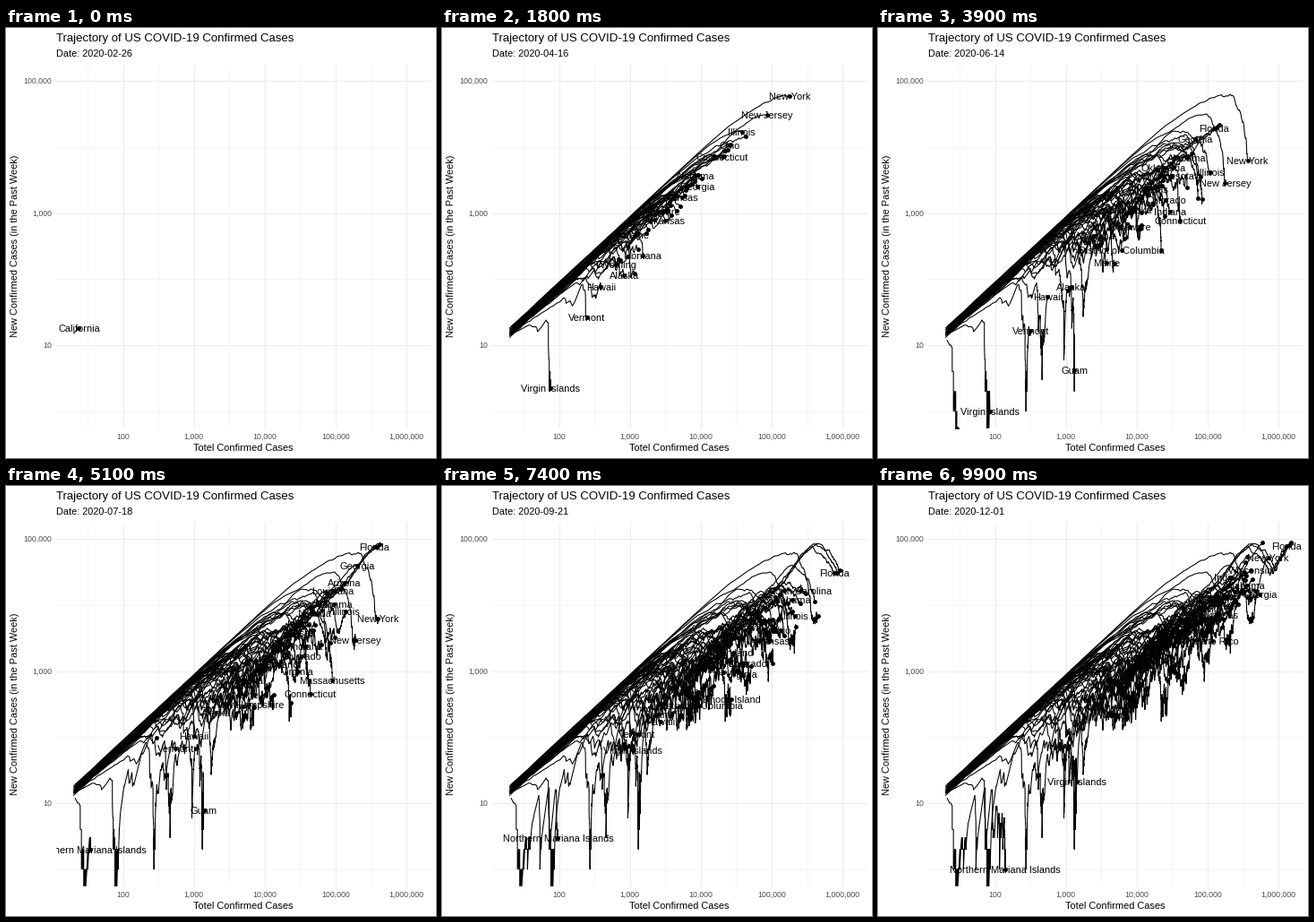
A matplotlib script that plays this animation: 480 by 480 pixels, repeating every 10 s.

```python
import numpy as np
import matplotlib.pyplot as plt
from matplotlib.animation import FuncAnimation
from matplotlib.collections import LineCollection

SIZE, DPI, FRAMES, LAST_DAY = 480, 96, 100, 279
PX = 72 / DPI                       # one pixel in points
LEFT, RIGHT, TOP, BOTTOM = 56, 474.5, 40.5, 446.5
DEC_X, DEC_Y = 79.15, 73.75         # pixels per decade
START = np.datetime64("2020-02-26")
PAD = 30                            # days simulated before the first date

X_LO, X_HI = (2 + (x - 130.5) / DEC_X for x in (LEFT, RIGHT))
Y_LO, Y_HI = (1 - (y - 354) / DEC_Y for y in (BOTTOM, TOP))

plt.rcParams["font.family"] = "Liberation Sans"
rng = np.random.default_rng(19)

# Each group shares one epidemic curve: log10 of weekly cases on these days.
# Scale and first day run evenly from its first member to its last.
KNOTS = [30, 50, 80, 109, 143, 208, 279]
GROUPS = [  # curve, scale range, first-day range, members
    ([-.4, 0, -.55, -1.05, -1.1, -1, -.1], (4.85, 3.6), (6, 13),
     "New York,New Jersey,Massachusetts,Connecticut,Rhode Island"),
    ([-1.4, -1, -.85, -.65, 0, -.42, 0], (4.95, 4.88), (1, 11),
     "California,Texas,Florida"),
    ([-1.2, -.63, -.85, -1.15, -1, -.85, 0], (4.8, 3.3), (8, 14),
     "Illinois,Ohio,Pennsylvania,Michigan,Indiana,Colorado,Virginia,"
     "Maryland,Washington,Delaware,New Hampshire,District of Columbia,Maine"),
    ([-1.25, -.8, -.75, -.42, 0, -.22, 0], (4.42, 3.75), (8, 15),
     "Georgia,Arizona,Tennessee,North Carolina,Alabama,Louisiana,"
     "South Carolina,Oklahoma,Nevada,Mississippi,Arkansas,Idaho,Puerto Rico"),
    ([-1.5, -1.2, -1, -1.1, -.72, -.3, 0], (4.55, 3.5), (8, 16),
     "Wisconsin,Minnesota,Missouri,Utah,Kansas,Kentucky,Iowa,Nebraska,"
     "New Mexico,Oregon,South Dakota,North Dakota,West Virginia,Wyoming"),
    ([-1.1, -1.3, -2.4, -1.5, -1, -.7, 0], (3.8, 2.8), (12, 15),
     "Montana,Alaska,Hawaii,Vermont"),
    ([.3, -.3, -1.4, -1.6, -1.5, .1, 0], (2.4, 2.4), (15, 15), "Guam"),
    ([-.2, -1.2, -1.4, -1.3, .5, .2, 0], (1.5, 1.5), (20, 20),
     "Virgin Islands"),
    ([0, -1, .2, .4, 0], (.4, .4), (70, 70), "Northern Mariana Islands"),
]


def trajectory(first, levels):
    """Daily log10 totals and weekly new cases, plus the first index shown."""
    days = np.arange(-PAD, LAST_DAY + 1)
    knots = KNOTS[-len(levels):]
    slope = max((levels[0] - 1.3) / (knots[0] - first), .07)
    xs = [first - 60, first, *knots]
    ys = [1.3 - 60 * slope, 1.3, *levels]
    level = np.mean([np.interp(days + 3 + k, xs, ys)
                     for k in (-4, -2, 0, 2, 4)], axis=0)
    sigma = np.clip(1.3 - .27 * level, .12, 1.2)
    sigma[days < max(30, first + 5)] = .08
    noise = np.exp(sigma * rng.normal(size=len(days)) - sigma ** 2 / 2)
    total = np.floor(np.cumsum(10 ** level / 7 * noise))
    new = total - np.concatenate([np.zeros(7), total[:-7]])
    lx = np.log10(np.maximum(total, 1))
    ly = np.where(new > 0, np.log10(np.maximum(new, 1)), Y_LO)
    return np.column_stack([lx, ly]), int(np.argmax(total >= 20))


tracks = {}
for curve, scales, firsts, members in GROUPS:
    members = members.split(",")
    count = len(members)
    spread = .1 if count > 5 else 0
    for name, scale, first in zip(members, np.linspace(*scales, count),
                                  np.linspace(*firsts, count)):
        jitter = rng.normal(0, 1, len(curve)) * spread
        tracks[name] = trajectory(first, scale + np.array(curve) + jitter)

# label priority: the first placed wins when two collide
names = sorted(tracks, key=lambda n: (n in ("Arizona", "California"), n))

fig = plt.figure(figsize=(SIZE / DPI, SIZE / DPI), dpi=DPI, facecolor="white")
ax = fig.add_axes([LEFT / SIZE, 1 - BOTTOM / SIZE,
                   (RIGHT - LEFT) / SIZE, (BOTTOM - TOP) / SIZE])
ax.set(xlim=(X_LO, X_HI), ylim=(Y_LO, Y_HI))
ax.axis("off")


def write(x, y, s, size, **kw):
    return fig.text(x / SIZE, 1 - y / SIZE, s, fontsize=size * PX,
                    va="baseline", **kw)


write(56, 15, "Trajectory of US COVID-19 Confirmed Cases", 13.2)
date = write(56, 32, "", 11)
write(265, 472, "Totel Confirmed Cases", 11, ha="center")
write(13.5, 243.5, "New Confirmed Cases (in the Past Week)", 11,
      ha="center", rotation=90, rotation_mode="anchor")

GRID = dict(color="#EBEBEB", zorder=0)
for e in range(2, 7):
    ax.axvline(e, lw=1.07 * PX, **GRID)
    ax.axvline(e - .5, lw=.53 * PX, **GRID)
    write(130.5 + DEC_X * (e - 2), 459, f"{10 ** e:,}", 8.8,
          ha="center", color="#4D4D4D")
for e in (1, 3, 5):
    ax.axhline(e, lw=1.07 * PX, **GRID)
    ax.axhline(e - 1, lw=.53 * PX, **GRID)
    write(51, 357.2 - DEC_Y * (e - 1), f"{10 ** e:,}", 8.8,
          ha="right", color="#4D4D4D")

lines = LineCollection([], colors="black", linewidths=1.07 * PX, zorder=2)
ax.add_collection(lines, autolim=False)
dots, = ax.plot([], [], "o", color="black", ms=4.9 * PX, mew=0, zorder=3)
labels = {n: ax.text(3, 3, n, fontsize=11 * PX, ha="center", va="baseline",
                     clip_on=True, zorder=4) for n in names}
renderer = fig.canvas.get_renderer()
widths = {n: t.get_window_extent(renderer).width / DEC_X
          for n, t in labels.items()}
HEIGHT = 7 / DEC_Y


def draw(n):
    day = n * LAST_DAY / (FRAMES - 1)
    k, part = int(day) + PAD, day % 1
    date.set_text(f"Date: {START + int(day)}")
    paths, heads, placed = [], [], []
    for name in names:
        pts, first = tracks[name]
        label = labels[name]
        label.set_visible(False)
        if k < first:
            continue
        head = pts[k]
        if part:
            head = head + part * (pts[k + 1] - head)
        paths.append(np.vstack([pts[first:k + 1], head]))
        heads.append(head)
        x, y = head
        w = widths[name]
        clear = all(abs(x - px) >= (w + pw) / 2 or abs(y - py) >= HEIGHT
                    for px, py, pw in placed)
        if clear and y > Y_LO + .05:
            placed.append((x, y, w))
            label.set_position((x, y - 4 / DEC_Y))
            label.set_visible(True)
    lines.set_segments(paths)
    dots.set_data(*np.array(heads).reshape(-1, 2).T)
    return [lines, dots, date, *labels.values()]


anim = FuncAnimation(fig, draw, frames=FRAMES, interval=100, repeat=True,
                     repeat_delay=0, blit=False)
plt.show()
```
